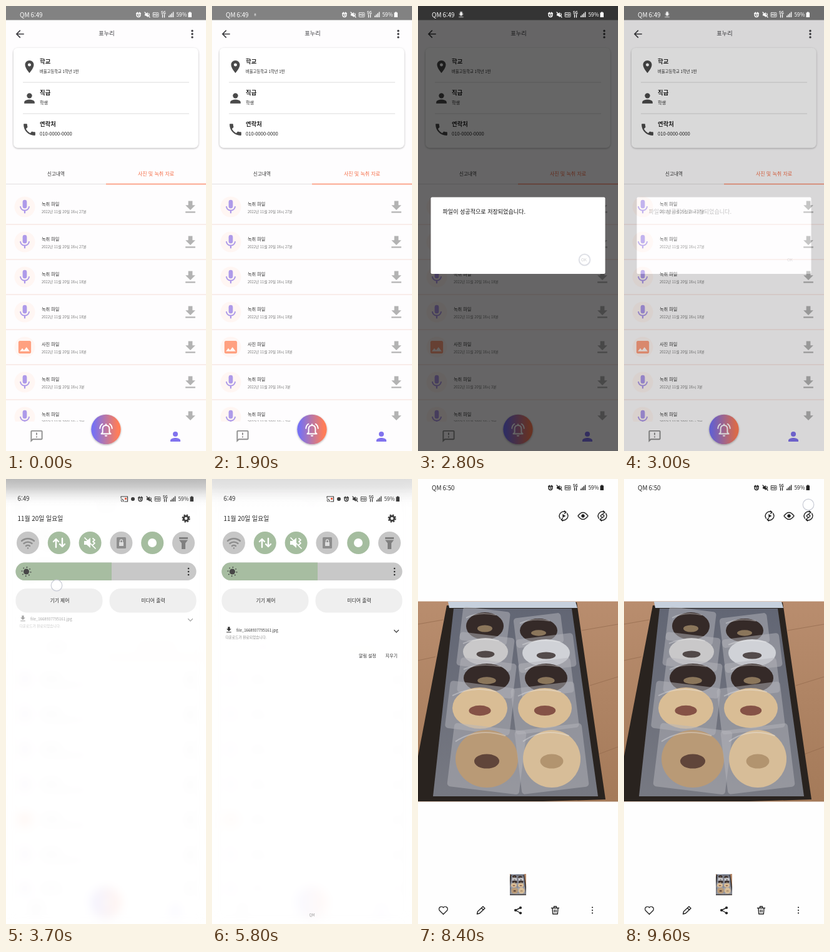
Animation, 320 px wide and 711 px high, one loop 9700 ms. Source, as an HTML page:

```html
<!DOCTYPE html>
<html lang="ko">
<head>
<meta charset="utf-8">
<title>파일 저장</title>
<style>
html, body { margin: 0; height: 100%; overflow: hidden; background: #fff; }
#stage { display: block; width: 100vw; height: 100vh; font-family: "Noto Sans CJK KR", "Noto Sans CJK", sans-serif; }
.mid { text-anchor: middle; }
.line { fill: none; stroke: currentColor; stroke-linecap: round; stroke-linejoin: round; }

.track { animation: 9.7s step-end infinite; }
#app { animation-name: app; }
#ripple { animation-name: ripple; }
#modal { animation-name: modal; }
#topLight { animation-name: topLight; }
#saved { animation-name: saved; }
#shade { animation-name: shade; }
#haze { animation-name: haze; }
#note { animation-name: note; }
#actions { animation-name: actions; }
#gallery { animation-name: gallery; }
#savedDark { animation-name: savedDark; }
#touch { animation-name: touch; }

@keyframes app {
  0% { opacity: 1; filter: none; }
  36.08% { opacity: .8; filter: blur(2px); }
  37.11% { opacity: .38; filter: blur(5px); }
  38.14% { opacity: .1; filter: blur(8px); }
  39.17% { opacity: .08; filter: blur(8px); }
  40.2%, 100% { opacity: .06; filter: blur(9px); }
}
@keyframes ripple {
  0% { opacity: 0; }
  11.34% { opacity: .05; }
  12.37% { opacity: .1; }
  14.43% { opacity: .06; }
  15.46%, 100% { opacity: 0; }
}
@keyframes modal {
  0% { opacity: 0; }
  20.61% { opacity: .2; animation-timing-function: steps(5, jump-start); }
  25.76% { opacity: 1; }
  29.89% { opacity: .6; }
  30.92% { opacity: .25; }
  31.95%, 100% { opacity: 0; }
}
@keyframes topLight {
  0% { opacity: 1; }
  36.08% { opacity: .6; }
  37.11%, 100% { opacity: 0; }
}
@keyframes saved {
  0% { transform: scale(0); }
  19.58% { transform: scale(.4); }
  20.61%, 100% { transform: scale(1); }
}
@keyframes shade {
  0% { opacity: 0; transform: translateY(-30px); }
  36.08% { opacity: .15; transform: translateY(-24px); }
  37.11% { opacity: .6; transform: translateY(-10px); }
  38.14% { opacity: 1; transform: none; }
  70.1% { opacity: .7; transform: translateY(-10px); }
  71.13% { opacity: .25; transform: translateY(-30px); }
  72.16%, 100% { opacity: 0; transform: none; }
}
@keyframes haze {
  0% { opacity: .9; }
  39.17% { opacity: .65; }
  40.2%, 100% { opacity: .4; }
}
@keyframes note {
  0% { opacity: .2; transform: translateY(-30px); }
  38.14% { opacity: .45; transform: translateY(-18px); }
  39.17% { opacity: .75; transform: translateY(-8px); }
  40.2% { opacity: .95; transform: translateY(-2px); }
  41.23%, 100% { opacity: 1; transform: none; }
}
@keyframes actions {
  0% { opacity: 0; }
  39.17% { opacity: .3; }
  40.2% { opacity: .7; }
  41.23%, 100% { opacity: 1; }
}
@keyframes gallery {
  0% { opacity: 0; transform: none; }
  71.13% { opacity: .5; transform: translate(32px, 71px) scale(.8); }
  72.16% { opacity: .9; transform: translate(8px, 22px) scale(.95); }
  73.19% { opacity: 1; transform: translateY(8px); }
  74.22% { opacity: 1; transform: translateY(4.5px); }
  75.25% { opacity: 1; transform: translateY(1.5px); }
  76.28%, 100% { opacity: 1; transform: none; }
}
@keyframes savedDark {
  0% { opacity: 0; }
  72.16% { opacity: 1; }
  76.28%, 100% { opacity: 0; }
}
@keyframes touch {
  0% { opacity: 0; transform: none; }
  11.34% { opacity: 1; transform: translate(295px, 545px); }
  13.4% { opacity: 0; }
  28.86% { opacity: 1; transform: translate(266.5px, 405.5px); }
  29.89% { opacity: 0; }
  36.08% { opacity: 1; transform: translate(81px, 12px); }
  37.11% { opacity: 1; transform: translate(81px, 90px); }
  38.14% { opacity: 1; transform: translate(81px, 170px); }
  39.17% { opacity: 1; transform: translate(81px, 245px); }
  40.2% { opacity: .5; transform: translate(81px, 300px); }
  41.23% { opacity: 0; }
  69.07% { opacity: 1; transform: translate(100px, 246px); }
  70.1% { opacity: 0; }
  96.9% { opacity: 1; transform: translate(295px, 41px); }
  100% { opacity: 1; transform: translate(295px, 41px); }
}
</style>
</head>
<body>
<svg id="stage" viewBox="0 0 320 711" preserveAspectRatio="none">
<defs>
  <symbol id="back" viewBox="0 0 24 24"><path d="M20 11H7.8l5.6-5.6L12 4l-8 8 8 8 1.4-1.4L7.8 13H20z"/></symbol>
  <symbol id="place" viewBox="0 0 24 24"><path d="M12 2C8.1 2 5 5.1 5 9c0 5.3 7 13 7 13s7-7.7 7-13c0-3.9-3.1-7-7-7zm0 9.5a2.5 2.5 0 0 1 0-5 2.5 2.5 0 0 1 0 5z"/></symbol>
  <symbol id="person" viewBox="0 0 24 24"><circle cx="12" cy="8" r="4"/><path d="M12 14c-2.7 0-8 1.3-8 4v2h16v-2c0-2.7-5.3-4-8-4z"/></symbol>
  <symbol id="phone" viewBox="0 0 24 24"><path d="M6.6 10.8c1.4 2.8 3.8 5.1 6.6 6.6l2.2-2.2c.3-.3.7-.4 1-.2 1.1.4 2.3.5 3.6.5.6 0 1 .5 1 1V20c0 .6-.4 1-1 1C10.600 21 3 13.400 3 4c0-.6.5-1 1-1h3.500c.6 0 1 .4 1 1 0 1.300.2 2.500.6 3.600.1.300 0 .7-.3 1z"/></symbol>
  <symbol id="mic" viewBox="0 0 24 24"><rect x="9" y="2" width="6" height="12" rx="3"/><path d="M17.3 11c0 3-2.5 5.1-5.3 5.1S6.700 14 6.700 11H5c0 3.400 2.700 6.200 6 6.700V21h2v-3.300c3.300-.5 6-3.300 6-6.700z"/></symbol>
  <symbol id="download" viewBox="0 0 24 24"><path d="M19 9h-4V3H9v6H5l7 7zM5 18v2h14v-2z"/></symbol>
  <symbol id="image" viewBox="0 0 24 24"><path d="M21 19V5c0-1.100-.9-2-2-2H5c-1.100 0-2 .9-2 2v14c0 1.100.9 2 2 2h14c1.100 0 2-.9 2-2zM8.500 13.500l2.500 3 3.500-4.500 4.500 6H5z"/></symbol>
  <symbol id="report" viewBox="0 0 24 24"><path d="M20 2H4c-1.100 0-2 .9-2 2v18l4-4h14c1.100 0 2-.9 2-2V4c0-1.100-.9-2-2-2zm0 14H5.200L4 17.200V4h16zM11 12h2v2h-2zM11 6h2v4h-2z"/></symbol>
  <symbol id="bell" viewBox="0 0 24 24"><path d="M10 20h4a2 2 0 0 1-4 0z"/><g class="line" stroke-width="1.800"><path d="M5 18h14l-2-2v-5c0-3.500-2-5.500-5-5.500S7 7.500 7 11v5zM12 5V4M3 10c.2-2.500 1.500-5 3.700-6.500M21 10c-.2-2.500-1.500-5-3.700-6.500"/></g></symbol>

  <g id="status" fill="currentColor">
    <g class="line" stroke-width="1.300">
      <circle cx="212" cy="14.500" r="3"/>
      <path d="M208.500 12l2-1.800M215.500 12l-2-1.800M212 13v2h1M222 10l8 8M228.500 12q1.500 2 0 4"/>
    </g>
    <path d="M222 12.500h2l3-2.500v8l-3-2.500h-2z"/>
    <rect x="235" y="10.500" width="9" height="7" rx="1" class="line" stroke-width=".8"/>
    <text class="mid" x="239.500" y="16" font-size="5.200" font-weight="700">HD</text>
    <text class="mid" x="252" y="13" font-size="6" font-weight="700">5G</text>
    <path class="line" d="M250.500 18v-4M253.500 14v4" stroke-width="1.300"/>
    <path d="M260 15.500h1.400V18H260zM262.300 13.500h1.400V18h-1.400zM264.600 11.500h1.400V18h-1.400zM266.900 9.500h1.400V18h-1.400z"/>
    <text x="272.500" y="17" font-size="8.300">59%</text>
    <path d="M293 9.500h2.500v1h1.500v7.500h-5.500v-7.500h1.500z"/>
  </g>

  <linearGradient id="fab"><stop offset=".08" stop-color="#7771f2"/><stop offset=".9" stop-color="#ff7d58"/></linearGradient>
  <linearGradient id="fog" x2="0" y2="1">
    <stop stop-color="#b2b2b2"/><stop offset=".3" stop-color="#cacaca"/><stop offset="1" stop-color="#fff" stop-opacity="0"/>
  </linearGradient>
  <linearGradient id="wood" x2="0" y2="1"><stop stop-color="#b98d6e"/><stop offset="1" stop-color="#a47a59"/></linearGradient>
  <linearGradient id="tray" x2="0" y2="1"><stop stop-color="#626674"/><stop offset="1" stop-color="#777982"/></linearGradient>
  <filter id="soft" x="-20%" y="-20%" width="140%" height="140%"><feDropShadow dx="0" dy="1" stdDeviation="1.800" flood-opacity=".33"/></filter>
  <clipPath id="frame"><path d="M0 195.500h320v320H0z"/></clipPath>

  <g id="photo" clip-path="url(#frame)">
    <path fill="url(#wood)" d="M0 195h320v321H0z"/>
    <path stroke="#8d6549" opacity=".6" d="M0 232l40-7M0 290l28-6M262 242l58-10M275 330l45-14M288 440l32-12"/>
    <path fill="#29231f" d="M46 202l208-5 46 315-100 3H0v-72z"/>
    <path fill="#c6d0dd" d="M48 196h204l3 10H50z"/>
    <path fill="url(#tray)" d="M57 207h189l42 300H24z"/>
    <g id="cakes"></g>
  </g>
</defs>

<g id="app" class="track">
  <path fill="#fefdfe" d="M0 0h320v711H0z"/>
  <path fill="#828282" d="M0 0h320v22.500H0z"/>
  <g fill="#3c3c40">
    <use href="#back" x="12.500" y="35" width="19.500" height="19.500"/>
    <text class="mid" x="161" y="47" font-size="9.200">표누리</text>
    <circle cx="298" cy="39.700" r="1.700"/><circle cx="298" cy="44.800" r="1.700"/><circle cx="298" cy="49.900" r="1.700"/>
  </g>
  <rect x="12" y="67" width="295.500" height="159.500" rx="7" fill="#fff" filter="url(#soft)"/>
  <path stroke="#dcdcdc" d="M27 122h266M27 172h266"/>
  <g fill="#4a4a4a">
    <use href="#place" x="25.500" y="85" width="24" height="24"/>
    <use href="#person" x="25" y="135" width="25" height="25"/>
    <use href="#phone" x="25" y="185" width="25" height="25"/>
  </g>
  <g fill="#222">
    <g font-size="9.400" font-weight="700"><text x="54" y="92">학교</text><text x="54" y="142">직급</text><text x="54" y="191.500">연락처</text></g>
    <text x="54" y="107" font-size="6.300">벼울고등학교 1학년 1반</text>
    <text x="54" y="157" font-size="7.200">학생</text>
    <text x="54" y="207" font-size="7.600">010-0000-0000</text>
  </g>
  <text class="mid" x="80" y="270.500" font-size="7.600" fill="#333">신고내역</text>
  <text class="mid" x="240" y="270.500" font-size="8" fill="#f56f49">사진 및 녹취 자료</text>
  <path stroke="#e2e0e0" d="M0 284.500h160"/>
  <path stroke="#fa8f70" stroke-width="1.400" d="M160 284.500h160"/>
  <g id="rows"></g>
  <circle id="ripple" class="track" cx="295" cy="545" r="18"/>
  <path fill="#fefdfe" d="M0 664h320v47H0z"/>
  <use href="#report" x="37.500" y="676" width="23" height="23" fill="#8f8f8f"/>
  <use href="#person" x="259" y="676" width="24" height="24" fill="#8173ee"/>
  <circle cx="160" cy="676.500" r="23.700" fill="url(#fab)" filter="url(#soft)"/>
  <use href="#bell" x="147" y="664" width="26" height="26" fill="#fff" color="#fff"/>
</g>

<g id="modal" class="track">
  <path opacity=".6" d="M0 0h320v711H0z"/>
  <rect x="20.500" y="305.500" width="279" height="122.500" rx="2" fill="#fff"/>
  <text x="39.500" y="331.500" font-size="9.050" fill="#111">파일이 성공적으로 저장되었습니다.</text>
  <text class="mid" x="265.500" y="407.500" font-size="6.500" fill="#85858c">OK</text>
</g>

<g id="topLight" class="track" fill="#fff" color="#fff">
  <text x="22" y="17.500" font-size="10">QM</text>
  <text x="39.500" y="17.500" font-size="9.800">6:49</text>
  <g transform="translate(69 14)"><use id="saved" class="track" href="#download" x="-6.500" y="-6.500" width="13" height="13"/></g>
  <use href="#status"/>
</g>

<g id="shade" class="track" color="#3c3c3c">
  <path id="haze" class="track" fill="url(#fog)" d="M0 0h320v46H0z"/>
  <text x="18.500" y="35" font-size="9.800" fill="#333">6:49</text>
  <use href="#status" x="3" y="18"/>
  <path class="line" d="M184 30v-2h10.500v8H190M184 32q4 0 4 4M184 34.500q1.500 0 1.500 1.500" stroke-width="1.200"/>
  <path fill="#e5624a" d="M190 30h3v3h-3z"/>
  <circle cx="203" cy="32" r="3" fill="#3c3c3c"/>
  <text x="18.500" y="66.500" font-size="9.900" fill="#222">11월 20일 일요일</text>
  <circle cx="288" cy="63" r="3.700" class="line" stroke-width="2.800"/>
  <circle cx="288" cy="63" r="5.600" fill="none" stroke="#3c3c3c" stroke-width="2" stroke-dasharray="2.400 2"/>
  <g id="tiles"></g>
  <g class="line" stroke-width="2.400">
    <path color="#8d8d8d" d="M25 99a15 15 0 0 1 20 0M28.500 103a10 10 0 0 1 13 0M32 107a5 5 0 0 1 6 0M35 110.500v.1"/>
    <path color="#fff" d="M80 109V96l-4 4M80 96l4 4M90 95v13l-4-4M90 108l4-4"/>
    <path color="#fff" stroke-width="1.700" d="M126 94l17 17M139 95l3 2.500-3 2.500 3 2.500-3 2.500"/>
  </g>
  <path fill="#fff" d="M125 99h4l6-5v16l-6-5h-4z"/>
  <rect x="177" y="93" width="15" height="18" rx="1.500" fill="#8d8d8d"/>
  <path fill="#ddd" d="M181 101h7v6h-7z"/><path class="line" color="#ddd" d="M182.500 101v-2a2 2 0 0 1 4 0v2" stroke-width="1.300"/>
  <circle cx="234" cy="102" r="7" fill="#fff"/>
  <path fill="#7f7f7f" d="M277 93h14v3h-14zM277 97.500h14l-4 5V112h-6v-9.500z"/>
  <rect x="15.500" y="133.500" width="289" height="28.500" rx="14.200" fill="#c8c8c8"/>
  <path fill="#a7bda1" d="M169 133.500H29.700a14.200 14.200 0 0 0 0 28.500H169z"/>
  <circle cx="32.500" cy="148" r="4.500" fill="#474747"/>
  <circle cx="32.500" cy="148" r="7" fill="none" stroke="#474747" stroke-width="1.800" stroke-dasharray="1.500 4"/>
  <g fill="#333"><circle cx="292" cy="143" r="1.300"/><circle cx="292" cy="148" r="1.300"/><circle cx="292" cy="153" r="1.300"/></g>
  <g fill="#efefef"><rect x="15.500" y="175" width="139" height="38.500" rx="18"/><rect x="165.500" y="175" width="139" height="38.500" rx="18"/></g>
  <g class="mid" font-size="7.900" fill="#2b2b2b"><text x="86" y="197">기기 제어</text><text x="235.500" y="197">미디어 출력</text></g>
  <g id="note" class="track" fill="#333">
    <use href="#download" x="20.500" y="234.500" width="13" height="13"/>
    <text x="39" y="243.500" font-size="6.100">file_1668937795161.jpg</text>
    <text x="21.500" y="255" font-size="5.700" fill="#888">다운로드가 완료되었습니다.</text>
    <path class="line" d="M291.500 241.500l3.500 3.500 3.500-3.500" stroke-width="1.200"/>
  </g>
  <g id="actions" class="track" fill="#333" font-size="7">
    <text x="235" y="285">알림 설정</text><text x="277.500" y="285">지우기</text>
    <text class="mid" x="160" y="698.500" font-size="5.800" fill="#999">QM</text>
  </g>
</g>

<g id="gallery" class="track" fill="#222" color="#222">
  <path fill="#fefefe" d="M0-10h320v731H0z"/>
  <text x="22" y="17.500" font-size="10">QM</text>
  <text x="39.500" y="17.500" font-size="9.800">6:50</text>
  <use id="savedDark" class="track" href="#download" x="62" y="6" width="13" height="13"/>
  <use href="#status"/>
  <g class="line" stroke-width="1.400">
    <path id="cycle" d="M227.500 63a6.800 6.800 0 0 1 9-9.800M238.500 55a6.800 6.800 0 0 1-9 9.800M234.500 51l2.500 2.200-2.500 2M231.500 67l-2.500-2.200 2.500-2"/>
    <use href="#cycle" x="62"/>
    <path d="M292 59l3-3 3 3-3 3zM256 59q8-11 16 0q-8 11-16 0z"/>
    <path d="M40.500 695.500l-6-6a3.800 3.800 0 0 1 6-4.700 3.800 3.800 0 0 1 6 4.700z"/>
    <path d="M94.500 695l1-4 8.500-8 3 3-8.500 8zM101.500 685.500l3 3"/>
    <path d="M213.500 685.500h12M215 685.500l.7 9.500h7.600l.7-9.500M217.500 685v-2h4v2M218.200 688.500v3.500M220.800 688.500v3.500"/>
    <path d="M164 685l-8 4 8 4.500"/>
  </g>
  <path d="M231.300 56l5 3-5 3z"/><circle cx="264" cy="59" r="2.700"/>
  <circle cx="164" cy="685" r="2.100"/><circle cx="156" cy="689" r="2.100"/><circle cx="164" cy="693.500" r="2.100"/>
  <circle cx="279" cy="684.500" r="1.100"/><circle cx="279" cy="689" r="1.100"/><circle cx="279" cy="693.500" r="1.100"/>
  <use href="#photo"/>
  <svg x="147" y="631" width="26" height="34" viewBox="38 195.500 245 320"><use href="#photo"/></svg>
</g>

<circle id="touch" class="track" r="8.800" fill="#fff" fill-opacity=".6" stroke="#c9ccd6" stroke-width="1.200"/>
</svg>
<script>
const fill = (id, items, draw) => document.getElementById(id).innerHTML = items.map(draw).join('');

// Minute of each recording; the fifth entry is a picture.
fill('rows', [27, 27, 18, 18, 18, 3, 3], (minute, i) => {
  const y = 321 + i * 56, pic = i === 4;
  return `<circle cx="30" cy="${y}" r="16.500" fill="#fff6f3"/>
    <use href="#${pic ? 'image' : 'mic'}" x="16.500" y="${y - 13.500}" width="27" height="27" fill="${pic ? '#ffa080' : '#ae9ae9'}"/>
    <text x="57" y="${y - 2.500}" font-size="7.200" fill="#333">${pic ? '사진' : '녹취'} 파일</text>
    <text x="57" y="${y + 9.500}" font-size="5.800" fill="#777">2022년 11월 20일 18시 ${minute}분</text>
    <use href="#download" x="281.500" y="${y - 13}" width="27" height="27" fill="#b3b3b3"/>
    <path stroke="#f5dcd5" d="M0 ${y + 28}h320"/>`;
});

fill('tiles', [0, 1, 1, 0, 1, 0], (on, i) =>
  `<circle cx="${35 + i * 49.800}" cy="102" r="18" fill="${on ? '#a5bd9f' : '#c6c6c6'}"/>`);

// Wrapped cakes: x, y, radii, cake and label colour.
const dark = '#352a28', cream = '#d9bd95', gold = '#a08a68', red = '#713832';
fill('cakes', [
  [107, 235, 30, 22, dark, gold], [193, 242, 30, 19, dark, gold],
  [108, 276, 36, 22, '#c9c8c9', dark], [205, 278, 38, 22, '#d0d2d7', dark],
  [110, 318, 37, 23, dark, gold], [205, 318, 34, 23, dark, gold],
  [99, 366, 44, 33, cream, red], [203, 366, 43, 32, cream, red],
  [110, 447, 50, 46, '#b99a76', '#4a302b'], [214, 447, 46, 46, '#d7bd98', '#a98a66']
], ([x, y, rx, ry, cake, label], i) =>
  `<rect x="${x - rx - 8}" y="${y - ry - 5}" width="${rx * 2 + 16}" height="${ry * 2 + 10}" rx="5"
    fill="#b5b5bc" opacity=".5" transform="rotate(${i % 2 ? -7 : 7} ${x} ${y})"/>
  <ellipse cx="${x}" cy="${y}" rx="${rx}" ry="${ry}" fill="${cake}"/>
  <ellipse cx="${x}" cy="${y + 4}" rx="${rx * .4}" ry="${ry * .25}" fill="${label}" opacity=".8"/>
  <path d="M${x - rx} ${y - ry * .6}q${rx * .7} ${-ry * .5} ${rx * 1.600} ${-ry * .2}" fill="none" stroke="#eee" stroke-width="2" opacity=".35"/>`);
</script>
</body>
</html>
```
